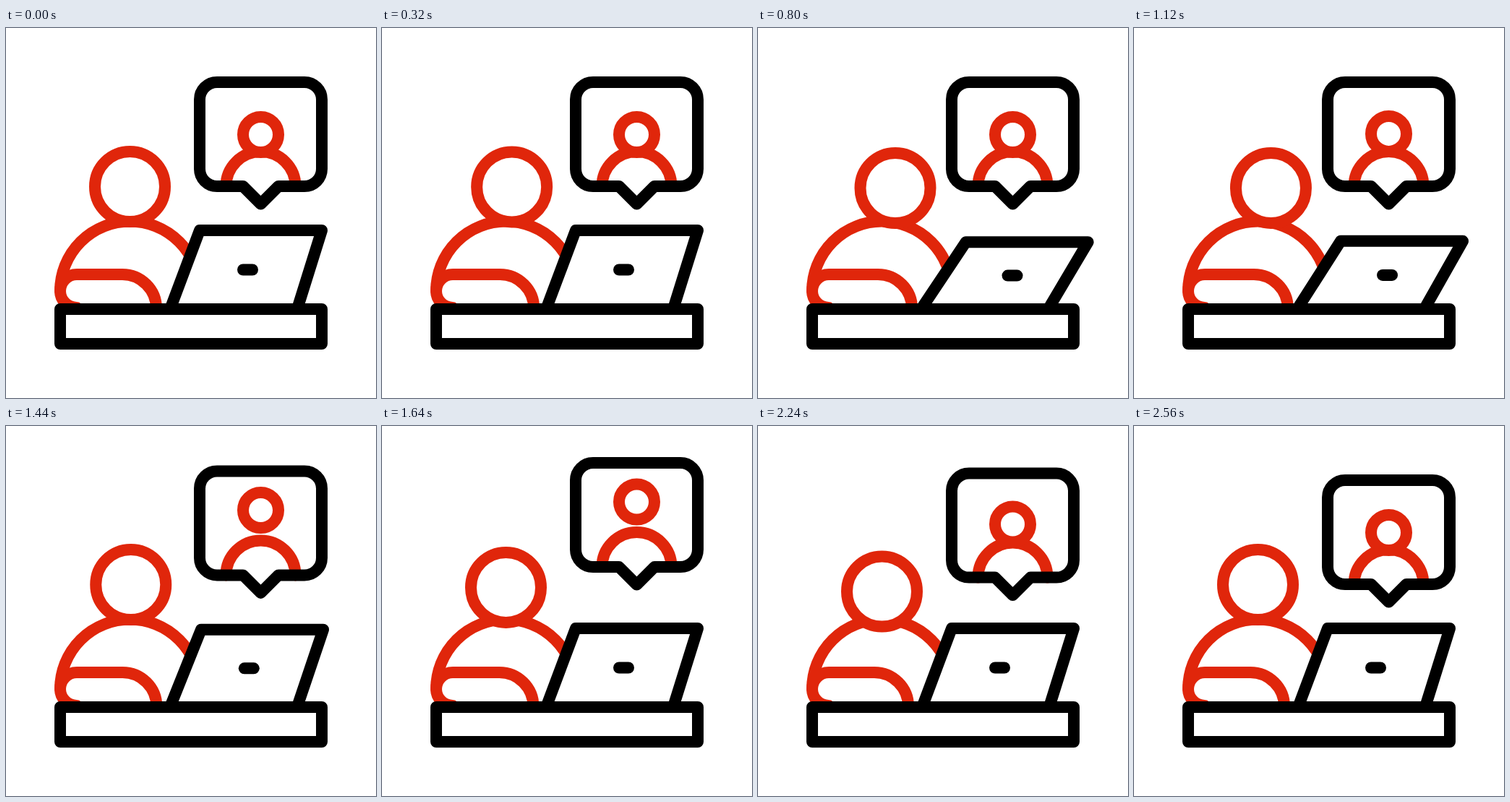
These frames come from a looping animation (512 px wide and 512 px high, 2720 ms). An HTML page:

```html
<!DOCTYPE html>
<html lang="en">
<head>
<meta charset="utf-8">
<title>Video call</title>
<style>
  html, body { margin: 0; height: 100%; overflow: hidden; background: #fff; }
  svg { display: block; width: 100%; height: 100%; }
  svg * { stroke-width: 16; stroke-linecap: round; stroke-linejoin: round; }
  .red { stroke: #e0260b; }
  .black { stroke: #000; }
</style>
</head>
<body>
<svg viewBox="0 0 512 512" fill="#fff">
  <g class="red">
    <path d="M75 364a96.5 96.5 0 0 1 193 0" fill="none"/>
    <path id="arm"/>
    <circle id="head" cx="171.5" cy="219.5" r="48.5"/>
  </g>
  <g class="black">
    <path id="lid"/>
    <path id="camera" d="M328 334.5h13"/>
    <rect x="75" y="389" width="362" height="48"/>
  </g>
  <g id="bubble">
    <g class="red">
      <path d="M304.5 219a48 48 0 0 1 96 0" fill="none"/>
      <circle id="caller" cx="352.5" cy="147.5" r="24.5"/>
    </g>
    <path class="black" fill="none" d="M292 75H413a24 24 0 0 1 24 24V195a24 24 0 0 1 -24 24H377L352.5 243.5L328 219H292a24 24 0 0 1 -24 -24V99a24 24 0 0 1 24 -24z"/>
  </g>
</svg>
<script>
const LOOP = 2720, STEP = 40;
const part = id => document.getElementById(id);
const [arm, head, lid, camera, bubble, caller] =
  ['arm', 'head', 'lid', 'camera', 'bubble', 'caller'].map(part);

const ease = (t, start, end) => {
  const u = Math.min(1, Math.max(0, (t - start) / (end - start)));
  return u * u * (3 - 2 * u);
};
// Rises from 0 to 1 between a and b, falls back between c and d.
const pulse = (t, a, b, c, d) => ease(t, a, b) - ease(t, c, d);
const move = (el, x, y) => el.setAttribute('transform', `translate(${x} ${y})`);

function draw(t) {
  const lean = pulse(t, 120, 554, 1075, 1509);
  const nod = pulse(t, 1500, 1920, 2063, 2497);
  const reach = 5 * (lean + pulse(t, 1500, 1900, 1920, 2240));
  const tilt = pulse(t, 315, 840, 1018, 1543);
  const x = 20 * tilt, y = 16.4 * tilt;

  move(head, 18.5 * lean, 2 * lean * lean + 15 * nod);
  arm.setAttribute('d', `M98 387a23 23 0 0 1 0 -46H${161 + reach}a47 47 0 0 1 47 47`);
  lid.setAttribute('d', `M229 384L${268 + x} ${280 + y}H${437 + x}L404.5 384`);
  move(camera, 0.89 * x, 0.5 * y);
  move(bubble, 0, -28.5 * pulse(t, 1120, 1816, 1850, 2484));
  move(caller, 0, -18.5 * pulse(t, 1060, 1460, 1900, 2330));
}

function tick() {
  const t = performance.now() % LOOP;
  draw(t - t % STEP);
  requestAnimationFrame(tick);
}
tick();
</script>
</body>
</html>
```
